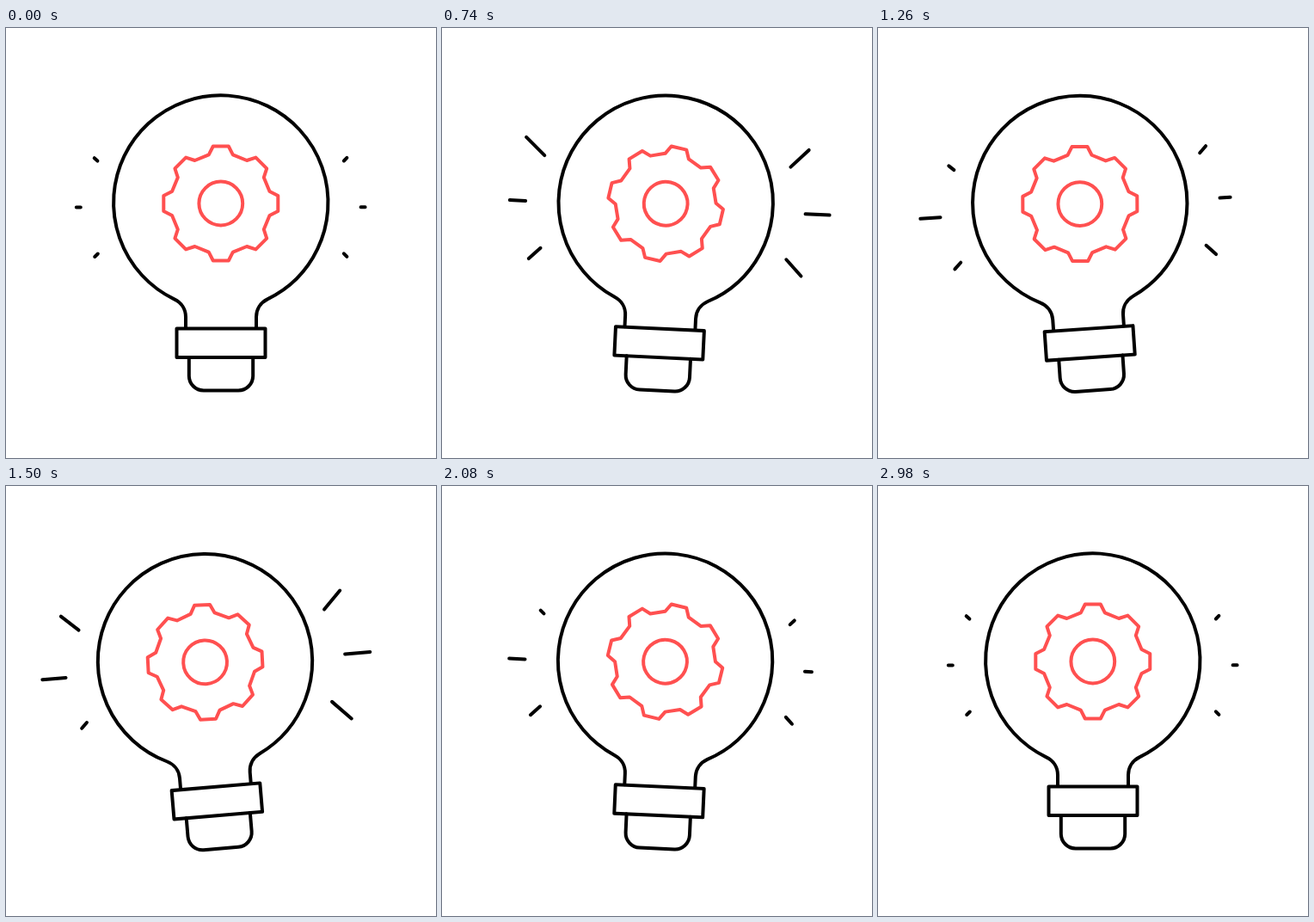
Recreate the animation shown at these times as an HTML page with a canvas. Size 500 by 500 pixels, loop 3000 ms.

```html
<!DOCTYPE html>
<html lang="en">
<head>
<meta charset="utf-8">
<title>Idea bulb</title>
<style>
html, body { margin: 0; width: 100%; height: 100%; overflow: hidden; background: #fff; }
canvas { display: block; width: 500px; height: 500px; }
</style>
</head>
<body>
<canvas id="stage" width="500" height="500"></canvas>
<script>
const ctx = document.getElementById('stage').getContext('2d');
const LOOP = 3000, END = 2980, STEP = 20;
const INK = '#000', RED = '#ff5050';
const RAD = Math.PI / 180;

// [time, degrees]
const SWING = [[0, 0], [960, 3.15], [1380, -5.7], [1980, 2.9], [2450, 0], [END, 0]];

// Inner end, outward direction, delay before the first pulse
const HALF = 440, SHORT = 5, LONG = 30;
const RAYS = [
  { x: 86.8, y: 208.5, dx: -1, dy: 0, delay: 90 },
  { x: 392.9, y: 262.3, dx: 0.7, dy: 0.714, delay: 185 },
  { x: 412.6, y: 208.3, dx: 1, dy: 0, delay: 225 },
  { x: 392.9, y: 154.5, dx: 0.7, dy: -0.714, delay: 245 },
  { x: 106.4, y: 154.6, dx: -0.74, dy: -0.673, delay: 290 },
  { x: 106.8, y: 262.5, dx: -0.714, dy: 0.7, delay: 510 }
];
for (const ray of RAYS) ray.keys = pulseKeys(ray.delay);

function pulseKeys(delay) {
  const keys = [[0, SHORT]];
  for (let i = 0; i < 6; i++) keys.push([delay + i * HALF, i % 2 ? LONG : SHORT]);
  keys.push([END, SHORT]);
  return keys;
}

function ease(p) {
  return p * p * (3 - 2 * p);
}

function valueAt(keys, t) {
  for (let i = 1; i < keys.length; i++) {
    const [t0, a] = keys[i - 1], [t1, b] = keys[i];
    if (t <= t1) return a + (b - a) * ease((t - t0) / (t1 - t0));
  }
  return keys[keys.length - 1][1];
}

function drawBulb() {
  const cx = 249.8, cy = 203, r = 124.7;
  const gap = Math.atan2(54, 112);
  const ex = r * Math.sin(gap), ey = cy + r * Math.cos(gap);
  ctx.beginPath();
  ctx.moveTo(209, 349);
  ctx.lineTo(209, 336);
  ctx.bezierCurveTo(209, 327, 204, 319.3, cx - ex, ey);
  ctx.arc(cx, cy, r, Math.PI / 2 + gap, Math.PI / 2 - gap + 2 * Math.PI);
  ctx.bezierCurveTo(296, 319.3, 291, 327, 291, 336);
  ctx.lineTo(291, 349);
  ctx.stroke();

  ctx.strokeRect(198.5, 349.5, 103, 33.5);

  ctx.beginPath();
  ctx.moveTo(212.8, 383);
  ctx.arcTo(212.8, 421.5, 250, 421.5, 17);
  ctx.arcTo(287.2, 421.5, 287.2, 383, 17);
  ctx.lineTo(287.2, 383);
  ctx.stroke();
}

function drawRays(t) {
  ctx.beginPath();
  for (const { x, y, dx, dy, keys } of RAYS) {
    const len = valueAt(keys, t);
    ctx.moveTo(x, y);
    ctx.lineTo(x + dx * len, y + dy * len);
  }
  ctx.stroke();
}

function drawGear(angle) {
  const tooth = [[-14, -56.7], [-9, -66.5], [9, -66.5], [14, -56.7]];
  ctx.save();
  ctx.translate(249.8, 204);
  ctx.rotate(angle);
  ctx.beginPath();
  for (let i = 0; i < 8; i++) {
    const c = Math.cos(i * Math.PI / 4), s = Math.sin(i * Math.PI / 4);
    for (const [x, y] of tooth) ctx.lineTo(x * c - y * s, x * s + y * c);
  }
  ctx.closePath();
  ctx.stroke();
  ctx.beginPath();
  ctx.arc(0, 0, 25.4, 0, 2 * Math.PI);
  ctx.stroke();
  ctx.restore();
}

function draw(t) {
  ctx.fillStyle = '#fff';
  ctx.fillRect(0, 0, 500, 500);
  ctx.lineWidth = 4;
  ctx.lineCap = ctx.lineJoin = 'round';
  ctx.save();
  ctx.translate(250, 421.5);
  ctx.rotate(valueAt(SWING, t) * RAD);
  ctx.translate(-250, -421.5);
  ctx.strokeStyle = INK;
  drawBulb();
  drawRays(t);
  ctx.strokeStyle = RED;
  drawGear(ease(t / END) * 2 * Math.PI);
  ctx.restore();
}

const start = performance.now();
function tick() {
  const t = (performance.now() - start) % LOOP;
  draw(Math.floor(t / STEP) * STEP);
  requestAnimationFrame(tick);
}
tick();
</script>
</body>
</html>
```
